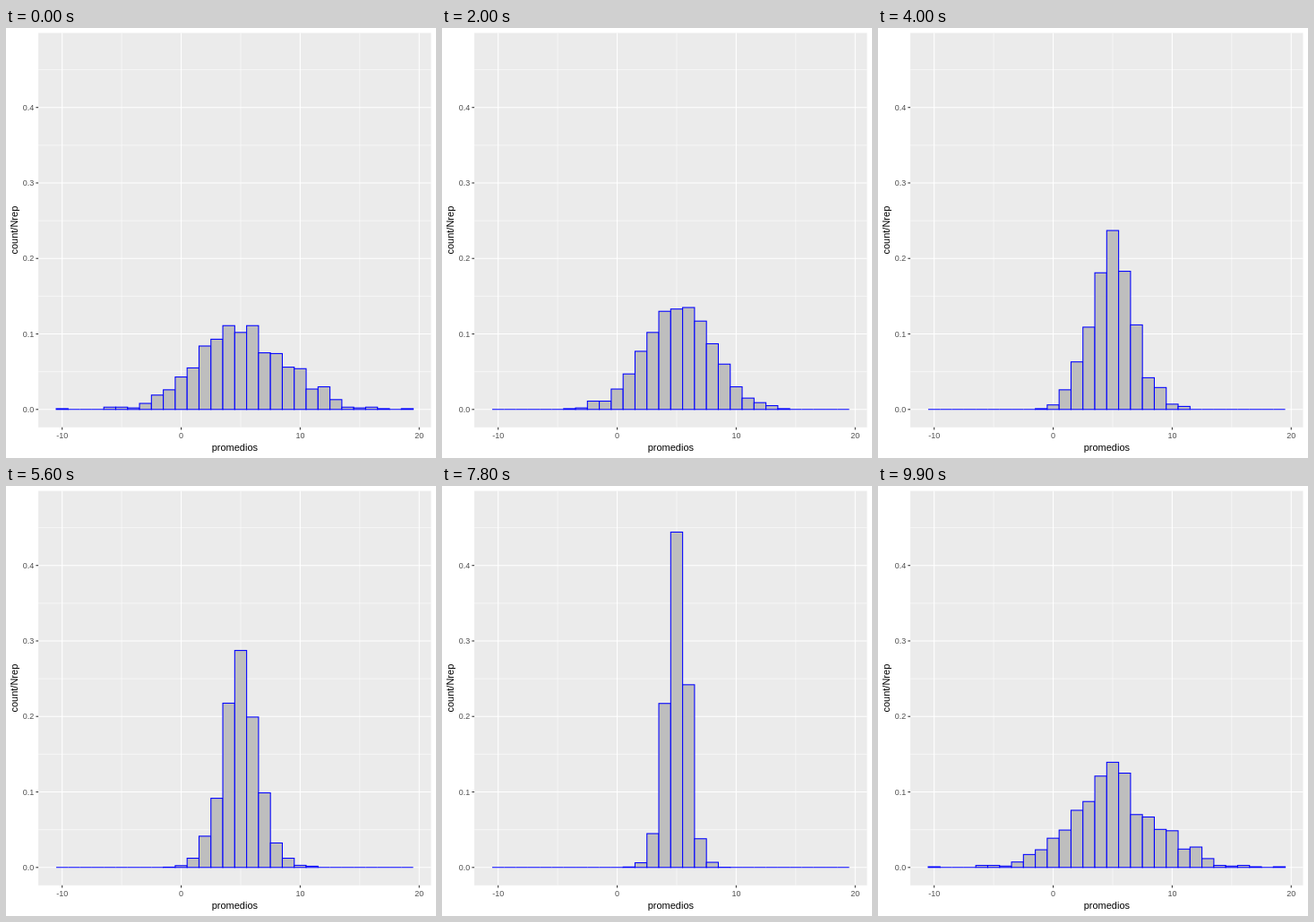
Recreate the animation shown at these times as an HTML page with a canvas. Size 480 by 480 pixels, loop 10 s.

```html
<!DOCTYPE html>
<html lang="es">
<head>
<meta charset="utf-8">
<title>promedios</title>
<style>
html, body { margin: 0; width: 100%; height: 100%; overflow: hidden; background: #fff; }
canvas { display: block; width: 480px; height: 480px; }
</style>
</head>
<body>
<canvas id="plot" width="480" height="480"></canvas>
<script>
const ctx = document.getElementById('plot').getContext('2d');

const LEFT = 36.13, RIGHT = 474.52, TOP = 5.48, BOTTOM = 445.8;
const W = RIGHT - LEFT, H = BOTTOM - TOP;
const FIRST = -10, BARS = 30, MAX = 475;
const LINE = 1.07, TICK = 2.74;
const FONT = '"Liberation Sans", Arial, Helvetica, sans-serif';

// Bin counts per thousand: first bin, then consecutive values
const states = [
  [-10, [1, 0, 0, 0, 3, 3, 2, 8, 19, 26, 43, 55, 84, 93, 111, 102, 111, 75, 74,
         56, 54, 27, 30, 13, 3, 2, 3, 1, 0, 1]],
  [-4, [1, 2, 11, 11, 27, 47, 77, 102, 130, 133, 135, 117, 87, 60, 30, 15, 9, 5, 1]],
  [-1, [1, 6, 26, 63, 109, 181, 237, 183, 112, 42, 29, 7, 4]],
  [1, [3, 27, 80, 242, 321, 210, 90, 26, 1]],
  [2, [1, 36, 211, 475, 250, 25, 2]]
].map(([start, counts]) =>
  Array.from({ length: BARS }, (_, i) => counts[i + FIRST - start] || 0));

const STAY = 2000, HOLD = 1100, STEP = 100;

const px = v => LEFT + W * (0.05 + (v - FIRST + 0.5) / BARS) / 1.1 ;
const py = v => BOTTOM - H * (0.05 + v / MAX) / 1.1;

function line(x1, y1, x2, y2, color, width) {
  ctx.strokeStyle = color;
  ctx.lineWidth = width;
  ctx.beginPath();
  ctx.moveTo(x1, y1);
  ctx.lineTo(x2, y2);
  ctx.stroke();
}

function label(text, x, y, size, align, color) {
  ctx.font = size + 'px ' + FONT;
  ctx.textAlign = align;
  ctx.fillStyle = color;
  ctx.fillText(text, x, y);
}

const gridX = (v, width) => line(px(v), TOP, px(v), BOTTOM, '#fff', width);
const gridY = (v, width) => line(LEFT, py(v), RIGHT, py(v), '#fff', width);

function drawPanel() {
  ctx.fillStyle = '#fff';
  ctx.fillRect(0, 0, 480, 480);
  ctx.fillStyle = '#ebebeb';
  ctx.fillRect(LEFT, TOP, W, H);
  for (let v = 50; v < MAX; v += 100) gridY(v, LINE / 2);
  for (let v = -5; v < 20; v += 10) gridX(v, LINE / 2);
  for (let v = 0; v < MAX; v += 100) gridY(v, LINE);
  for (let v = -10; v <= 20; v += 10) gridX(v, LINE);
}

function drawBars(heights) {
  ctx.lineWidth = LINE;
  ctx.strokeStyle = '#0000ff';
  ctx.fillStyle = '#bebebe';
  const w = px(1) - px(0);
  heights.forEach((h, i) => {
    const box = [px(FIRST + i - 0.5), py(h), w, py(0) - py(h)];
    ctx.fillRect(...box);
    ctx.strokeRect(...box);
  });
}

function drawAxes() {
  for (let v = 0; v < MAX; v += 100) {
    line(LEFT - TICK, py(v), LEFT, py(v), '#333', LINE);
    label((v / 1000).toFixed(1), 31.2, py(v) + 3.2, 9, 'right', '#4d4d4d');
  }
  for (let v = -10; v <= 20; v += 10) {
    line(px(v), BOTTOM, px(v), BOTTOM + TICK, '#333', LINE);
    label(String(v), px(v), 458, 9, 'center', '#4d4d4d');
  }
  label('promedios', LEFT + W / 2, 472, 11, 'center', '#000');
  ctx.save();
  ctx.translate(13, TOP + H / 2);
  ctx.rotate(-Math.PI / 2);
  label('count/Nrep', 0, 0, 11, 'center', '#000');
  ctx.restore();
}

function heightsAt(ms) {
  const t = ms % (STAY * states.length);
  const k = Math.floor(t / STAY);
  const local = t - k * STAY;
  const mix = local < HOLD ? 0 : (Math.floor((local - HOLD) / STEP) + 1) / 10;
  const next = states[(k + 1) % states.length];
  return states[k].map((h, i) => h + (next[i] - h) * mix);
}

function frame(now) {
  drawPanel();
  drawBars(heightsAt(now));
  drawAxes();
  requestAnimationFrame(frame);
}
frame(0);
</script>
</body>
</html>
```
